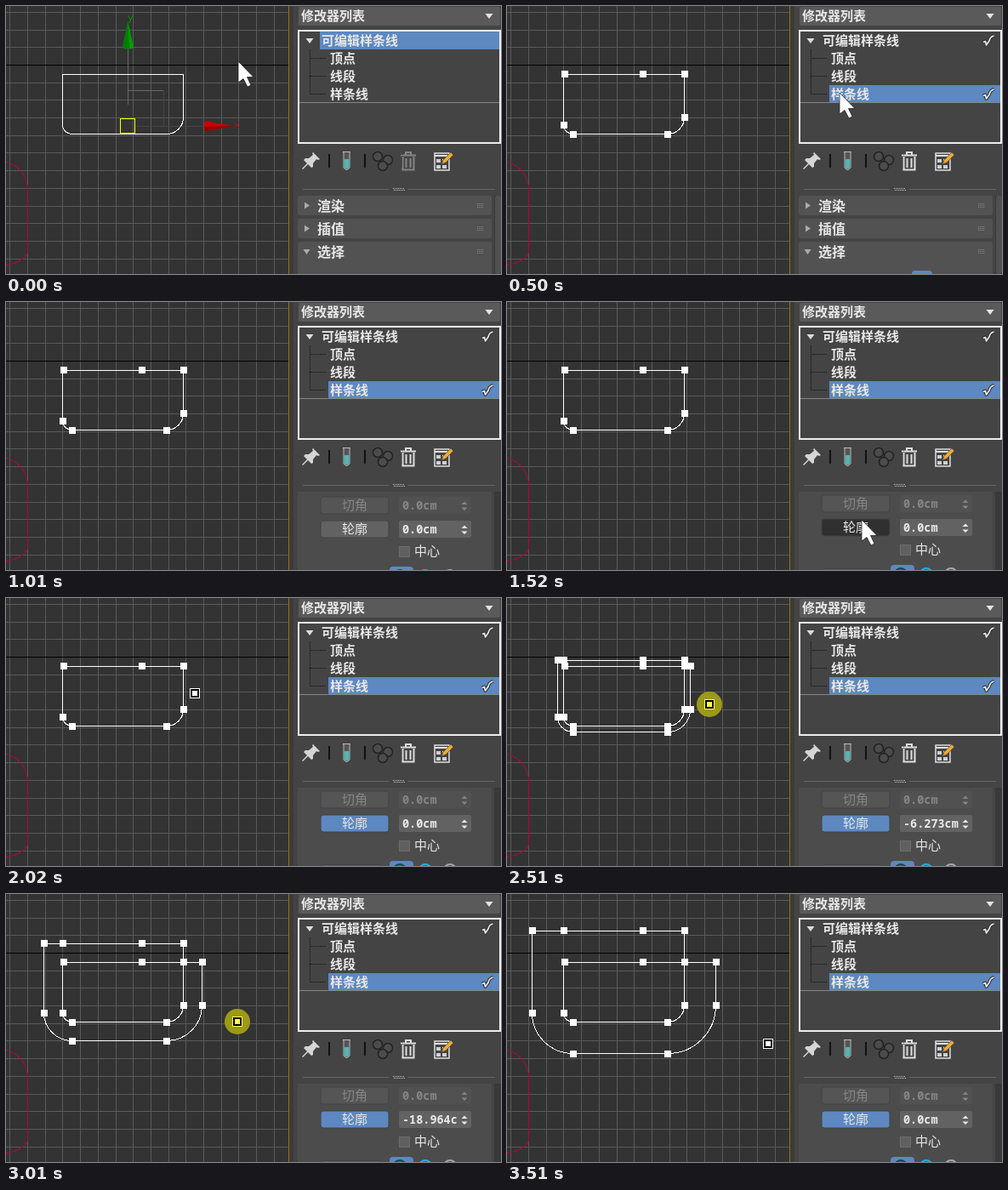
Recreate the animation shown at these times as an HTML page. Size 582 by 315 pixels, loop 4010 ms.

```html
<!DOCTYPE html>
<html lang="zh-CN">
<head>
<meta charset="utf-8">
<title>Spline outline</title>
<style>
html, body { margin: 0; width: 100%; height: 100%; overflow: hidden; background: #444; }
svg { display: block; width: 582px; height: 315px; }
text { font: 700 15px "Noto Sans CJK SC", "Noto Sans CJK", sans-serif; fill: #e8e8e8; }
.thin { font-weight: 500; }
.num { font: 600 13.5px "Noto Sans Mono", monospace; }
.big { font-size: 16px; }
.dim { fill: #858585; }
.crisp { shape-rendering: crispEdges; }
</style>
</head>
<body>
<svg id="stage" viewBox="0 0 582 315">
  <defs>
    <clipPath id="view"><rect width="332" height="315"/></clipPath>
    <clipPath id="field"><rect x="462" y="220" width="69" height="95"/></clipPath>
    <g id="tick" fill="none" stroke-linejoin="round">
      <path id="hook" d="M-6 1.500L-3.500 .5L-2.500 5L1 0Q2 -5 6.500 -6" stroke="#333" stroke-width="3.600"/>
      <use href="#hook" stroke="#e8e8e8"/>
      <path d="M-6 1.500L-3.500 .5L-2.500 5L1 0Q2 -5 6.500 -6" stroke="#e8e8e8" stroke-width="1.700"/>
    </g>
    <g id="grip" class="crisp" stroke="#8a8a8a" stroke-dasharray="1 1">
      <path d="M-4 -2.500h8M-4 -.5h8M-4 1.500h8"/>
    </g>
    <path id="spin" d="M-3.500 -1.500L0 -5L3.500 -1.500ZM-3.500 2L0 5.500L3.500 2Z"/>
  </defs>
  <rect width="582" height="315" fill="#444"/>

  <g clip-path="url(#view)">
    <rect width="332" height="315" fill="#333"/>
    <path id="grid" class="crisp" stroke="#5a5a5a" fill="none"/>
    <path class="crisp" d="M0 69.500H332" stroke="#000"/>
    <path class="crisp" d="M0 183.500C16 187 25.500 202 25.500 215V290Q19 302 0 304.500" fill="none" stroke="#b00538"/>
    <g id="gizmo">
      <g class="crisp" fill="none" stroke="#686868">
        <path d="M143.500 50V116M143.500 99.500H185"/>
        <path d="M185.500 100V141M152 141.500H233" stroke="#454545"/>
      </g>
      <path d="M143.500 18L150 49Q143.500 52 137 49Z" fill="#00a000"/>
      <path d="M143.500 18L145 50.500L137 49Z" fill="#007d00"/>
      <path d="M266 141L234 147.500Q232 141 234 135Z" fill="#c80000"/>
      <path d="M266 141L234 147.500L233 142Z" fill="#970000"/>
      <path d="M143.500 11l2.500 5M149 11l-4 9" stroke="#00a000" fill="none"/>
      <path d="M268 136.500l6 7M274 136.500l-6 7" stroke="#c80000" fill="none"/>
      <rect class="crisp" x="134.500" y="132.500" width="17" height="17" fill="none" stroke="#ff0"/>
    </g>
    <g class="crisp" fill="none" stroke="#fff">
      <path d="M66.500 80.500H208.500V131A19.500 19.500 0 0 1 189 150.500H78A11.500 10.500 0 0 1 66.500 140Z"/>
      <path id="outer"/>
    </g>
    <path id="knots" class="crisp" fill="#fff"/>
  </g>
  <rect x="332" width="1" height="315" fill="#907020"/>
  <rect x="333" width="5" height="315" fill="#3b3b3b"/>

  <rect x="344" y="1" width="237" height="22" rx="2" fill="#5a5a5a"/>
  <text x="347" y="16.500">修改器列表</text>
  <path d="M563.500 9h9l-4.500 6z" fill="#e4e4e4"/>
  <rect class="crisp" x="344" y="29" width="237" height="132" fill="#444" stroke="#eee" stroke-width="2"/>
  <path class="crisp" d="M345 113.500H580" stroke="#858585"/>
  <rect id="mark" fill="#5d88c0"/>
  <path d="M352.500 38h9l-4.500 6z" fill="#ddd"/>
  <path class="crisp" d="M357.500 51V104M357 61.500H377M357 82.500H377M357 103.500H377" stroke="#111" stroke-dasharray="1 1"/>
  <text x="371" y="46">可编辑样条线</text>
  <text x="381" y="67">顶点</text>
  <text x="381" y="88">线段</text>
  <text x="381" y="109">样条线</text>
  <g id="ticks">
    <use href="#tick" x="566" y="41"/>
    <use href="#tick" x="566" y="104"/>
  </g>

  <path class="crisp" d="M380 174V190M422 174V190M466 174V190" stroke="#111" stroke-width="2"/>
  <path d="M361 172l8 8-2 1-2-1-4 5v4l-2 1-4-4-6 6-1-1 6-6-4-4 2-2h4l5-4-1-2z" fill="#d5d5d5"/>
  <path d="M396 171.500h9M397 172v18q3.500 5 7 0v-18" fill="#555" stroke="#bbb"/>
  <path d="M398 180h5v10q-2.500 3-5 0z" fill="#4fb8b5"/>
  <g fill="#4c4c4c" stroke="#222" stroke-width="1.500">
    <circle cx="437" cy="177" r="5.500"/>
    <circle cx="449" cy="181" r="5.500"/>
    <circle cx="443" cy="188" r="5.500"/>
  </g>
  <path id="bin" fill="none" stroke-width="2" d="M464 175.500H482M470 175V172H476V175M466.500 177V192.500H479.500V177M470.500 179V190M475.500 179V190"/>
  <rect x="504" y="173" width="17" height="20" fill="none" stroke="#e0e0e0" stroke-width="1.500"/>
  <path d="M504 176H521" stroke="#e0e0e0" stroke-width="2"/>
  <path d="M506 180h5v4h-5zM513 180h5v4h-5zM506 187h5v4h-5zM513 187h5v4h-5z" fill="#d0d0d0"/>
  <path d="M512 186l2-5 9-9 3 3-9 9z" fill="#efaa30" stroke="#444" stroke-width=".7"/>

  <path class="crisp" d="M349 215.500H450M473 215.500H575" stroke="#666"/>
  <path class="crisp" d="M455 214.500H468M456 216.500H469" stroke="#ccc" stroke-dasharray="1 1"/>
  <rect x="574" y="223" width="8" height="92" fill="#393939"/>

  <g id="rolls">
    <rect x="575" y="223" width="7" height="92" rx="2" fill="#505050"/>
    <g fill="#525252">
      <rect x="343" y="223" width="228" height="23" rx="3"/>
      <rect x="343" y="250" width="228" height="23" rx="3"/>
      <rect x="343" y="277" width="228" height="42" rx="3"/>
    </g>
    <path d="M351 230.500v8l6-4zM351 257.500v8l6-4zM349.500 286h8l-4 6z" fill="#aaa"/>
    <text class="big" x="366" y="240.500">渲染</text>
    <text class="big" x="366" y="267.500">插值</text>
    <text class="big" x="366" y="294.500">选择</text>
    <use href="#grip" x="558" y="235"/>
    <use href="#grip" x="558" y="262"/>
    <use href="#grip" x="558" y="289"/>
    <rect id="peek" x="476" y="311" width="24" height="10" rx="4" fill="#5d88c0"/>
  </g>

  <g id="params">
    <rect x="343" y="223" width="228" height="92" fill="#4c4c4c"/>
    <g id="body">
      <rect x="370" y="227" width="80" height="20" rx="3" fill="#555" stroke="#434343"/>
      <text class="thin dim" x="395" y="241.500">切角</text>
      <rect x="462" y="227" width="85" height="20" rx="2" fill="#515151"/>
      <text class="num dim" x="466" y="242">0.0cm</text>
      <use href="#spin" x="539" y="237.500" fill="#858585"/>
      <rect id="btn" x="370" y="255" width="80" height="20" rx="3" stroke="#434343"/>
      <text class="thin" x="395" y="269.500">轮廓</text>
      <rect x="462" y="255" width="85" height="20" rx="2" fill="#626262"/>
      <text id="value" class="num" x="466" y="270" clip-path="url(#field)"></text>
      <use href="#spin" x="539" y="265.500" fill="#e8e8e8"/>
      <rect class="crisp" x="462.500" y="285.500" width="12" height="12" fill="#606060" stroke="#6c6c6c"/>
      <text class="thin" x="480" y="296">中心</text>
      <rect x="370" y="313.500" width="70" height="14" rx="3" fill="#5b5b5b" stroke="#434343"/>
      <rect x="451" y="309" width="28" height="18" rx="4" fill="#5d88c0"/>
      <g fill="none" stroke-width="2">
        <circle cx="463" cy="320" r="7" fill="#1c7770" stroke="#174c55"/>
        <circle cx="493" cy="320" r="7" fill="#236d79" stroke="#1ab4e6"/>
        <circle cx="522" cy="320" r="7" stroke="#aaa"/>
      </g>
    </g>
  </g>

  <path id="arrow" d="M0 0V25L6 20.500L11 30L15 28L10.500 18.500H18Z" fill="#fff" stroke="#222" stroke-width=".8"/>
  <g id="pick">
    <circle id="halo" r="15" fill="#a29f16" opacity=".95"/>
    <g class="crisp">
      <rect id="ring" x="-6" y="-6" width="12" height="12"/>
      <rect x="-5" y="-5" width="10" height="10" fill="#000"/>
      <rect id="core" x="-3" y="-3" width="6" height="6"/>
    </g>
  </g>
</svg>
<script>
const $ = id => document.getElementById(id);
const set = (id, attrs) => {
  for (const k in attrs) $(id).setAttribute(k, attrs[k]);
};
const show = (id, on) => set(id, { visibility: on ? "visible" : "hidden" });

const LOOP = 4010;
const CELL = 20.7;
const GRAY = "#626262", DARK = "#303030", BLUE = "#5d88c0";

// Each step holds until the next one starts.
const steps = [
  { at: 0, arrow: [273, 65] },
  { at: 500, sub: true, arrow: [391, 102] },
  { at: 1010, sub: true, open: true, scroll: 2, btn: GRAY },
  { at: 1520, sub: true, open: true, btn: DARK, arrow: [417, 256] },
  { at: 2020, sub: true, open: true, btn: BLUE, pick: [222, 112] },
  { at: 2510, sub: true, open: true, btn: BLUE, pick: [238, 125], drag: true, out: 7, value: "-6.273cm" },
  { at: 3010, sub: true, open: true, btn: BLUE, pick: [272, 150], drag: true, out: 22, value: "-18.964cm" },
  { at: 3510, sub: true, open: true, btn: BLUE, pick: [307, 176], out: 37 }
];

const base = [[68, 80], [160, 80], [209, 80], [209, 131], [189, 151], [78, 151], [67, 140]];
const square = ([x, y]) => `M${x - 4} ${y - 4}h8v8h-8z`;

function outerKnots(d) {
  const l = 67 - d, t = 80 - d, r = 209 + d, b = 151 + d;
  return [[l, t], [67, t], [160, t], [209, t], [r, 80], [r, 131], [189, b], [78, b], [l, 140]];
}

function outerPath(d) {
  const l = 66.5 - d, t = 80.5 - d, r = 208.5 + d, b = 150.5 + d;
  return `M${l} 140V${t}H208.5V80.5H${r}V131A${19.5 + d} ${19.5 + d} 0 0 1 189 ${b}` +
    `H78A${11.5 + d} ${10.5 + d} 0 0 1 ${l} 140Z`;
}

function drawGrid() {
  let d = "";
  for (let x = 4.3; x < 332; x += CELL) d += `M${Math.round(x) + 0.5} 0V315`;
  for (let y = 6.9; y < 315; y += CELL) d += `M0 ${Math.round(y) + 0.5}H332`;
  set("grid", { d });
}

function place(id, pos) {
  set(id, { display: pos ? "inline" : "none" });
  if (pos) set(id, { transform: `translate(${pos})` });
}

function draw(s) {
  const out = s.out || 0;
  show("gizmo", !s.sub);
  show("ticks", s.sub);
  show("peek", s.sub && !s.open);
  set("mark", s.sub
    ? { x: 379, y: 93, width: 201, height: 20 }
    : { x: 369, y: 30, width: 211, height: 21 });
  set("bin", { stroke: s.sub ? "#dedede" : "#858585" });

  const knots = !s.sub ? [] : out ? base.concat(outerKnots(out)) : base;
  set("knots", { d: knots.map(square).join("") });
  set("outer", { d: out ? outerPath(out) : "" });

  set("rolls", { display: s.open ? "none" : "inline" });
  set("params", { display: s.open ? "inline" : "none" });
  set("body", { transform: `translate(0 ${s.scroll || 0})` });
  set("btn", { fill: s.btn || GRAY });
  $("value").textContent = s.value || "0.0cm";

  place("arrow", s.arrow);
  place("pick", s.pick);
  set("halo", { display: s.drag ? "inline" : "none" });
  const ink = s.drag ? "#ffff4a" : "#fff";
  set("ring", { fill: ink });
  set("core", { fill: ink });
}

drawGrid();
const start = performance.now();
let last;
function tick() {
  const t = (performance.now() - start) % LOOP;
  const step = steps.filter(s => s.at <= t).pop();
  if (step !== last) draw(last = step);
  requestAnimationFrame(tick);
}
tick();
</script>
</body>
</html>
```
